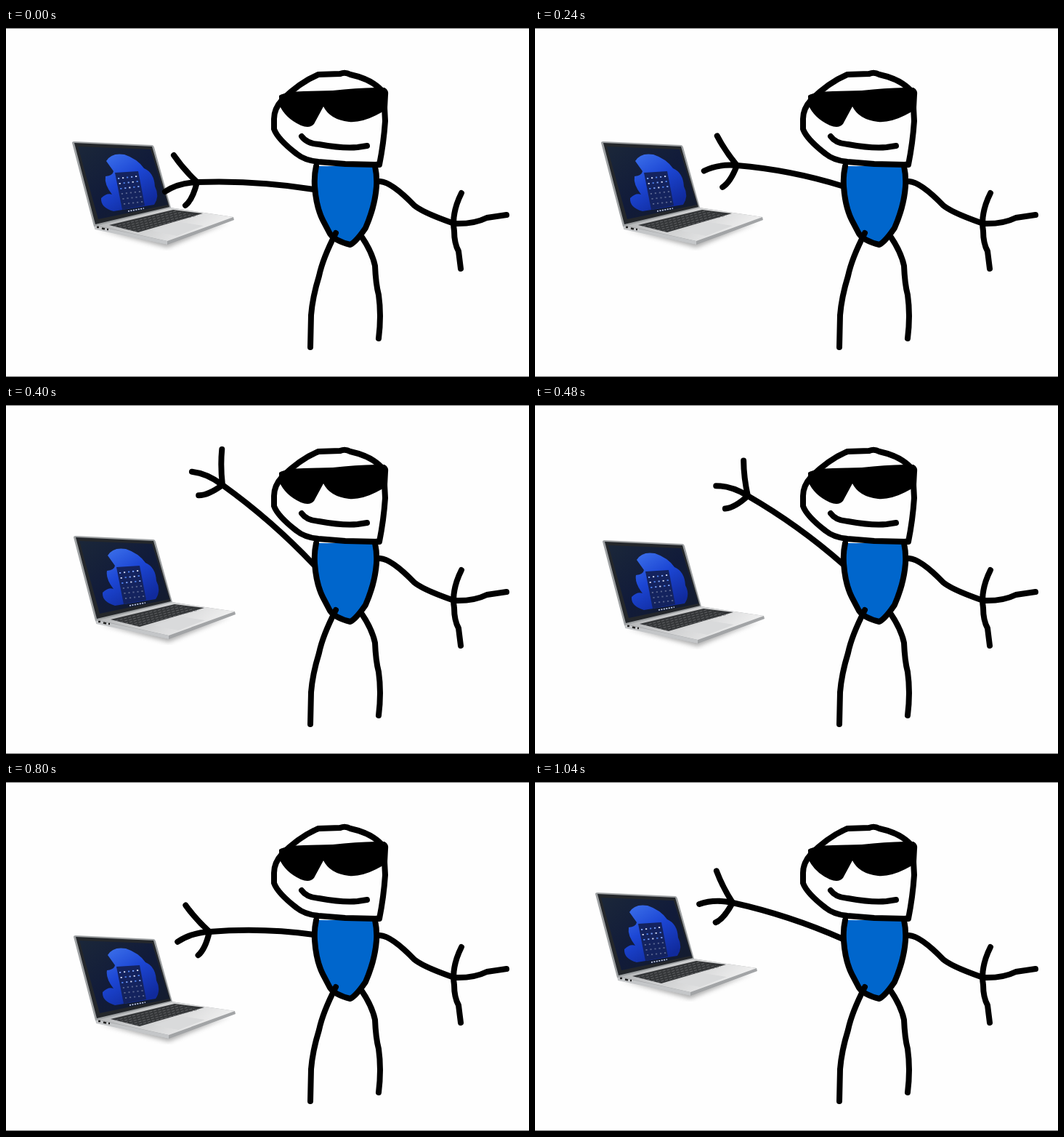
Recreate the animation shown at these times as an HTML page. Size 720 px wide and 480 px high, loop 1120 ms.

```html
<!DOCTYPE html>
<html lang="en">
<head>
<meta charset="utf-8">
<title>Stick figure and laptop</title>
<style>
  html, body { margin: 0; width: 100%; height: 100%; overflow: hidden; background: #fefefe; }
  svg { display: block; width: 100vw; height: 100vh; }
  .ink { fill: none; stroke: #000; stroke-width: 8; stroke-linecap: round; stroke-linejoin: round; }
</style>
</head>
<body>
<svg viewBox="0 0 720 480">
  <defs>
    <linearGradient id="deck" x1="0" y1="0" x2="1" y2="0.3">
      <stop offset="0" stop-color="#a9abad"/>
      <stop offset="0.5" stop-color="#cfd0d1"/>
      <stop offset="1" stop-color="#f0f0f0"/>
    </linearGradient>
    <linearGradient id="screen" x1="0" y1="0" x2="1" y2="1">
      <stop offset="0" stop-color="#1b2739"/>
      <stop offset="0.5" stop-color="#111b3a"/>
      <stop offset="1" stop-color="#141c2c"/>
    </linearGradient>
    <linearGradient id="glow" x1="0" y1="0" x2="0.6" y2="1">
      <stop offset="0" stop-color="#3f74ec"/>
      <stop offset="0.5" stop-color="#1c46d4"/>
      <stop offset="1" stop-color="#102a9c"/>
    </linearGradient>
    <filter id="blur"><feGaussianBlur stdDeviation="3"/></filter>
  </defs>

  <rect width="720" height="480" fill="#fefefe"/>
  <path d="M0 .5H720M0 479.5H720" stroke="#777"/>

  <g id="laptop">
    <path d="M126 277L222 302L308 266L222 288Z" fill="#777" opacity=".6" filter="url(#blur)"/>
    <path d="M121 271L226 247L313 260L314 264L222 298L122 276Z" fill="#a2a4a6"/>
    <path d="M122 271L226 247L313 260L222 293Z" fill="url(#deck)"/>
    <path d="M122 272L222 293V298L122 277Z" fill="#c4c6c8"/>
    <path d="M125 274h3M132 275.5l4 1M139 277h2" stroke="#222" stroke-width="2.5"/>
    <path d="M142 271L230 250L271 255L182 281Z" fill="#343638"/>
    <g id="keys" stroke="#737577" stroke-width=".7"></g>
    <path d="M202 279L240 267L272 272L235 286Z" fill="#d9dadb"/>
    <path d="M91 158Q91 156 94 156L201 161Q203 161 204 164L227 247L121 273Z" fill="#9da0a2"/>
    <path d="M94 158L201 163L225 246L123 270Z" fill="#24272b"/>
    <path d="M99 163L199 167L223 243L127 263Z" fill="url(#screen)"/>
    <path d="M138 183Q145 171 163 174Q181 180 190 193Q204 199 205 218Q212 231 204 243L148 252Q130 247 131 234Q139 226 146 229Q135 215 137 204Q147 203 148 197Z" fill="url(#glow)"/>
    <path d="M150 199L182 197L191 244L160 250Z" fill="#14235e"/>
    <g id="icons"></g>
    <path d="M168 252L190 248" stroke="#cbd5ee" stroke-width="1.6" stroke-dasharray="2 1.5"/>
  </g>

  <path id="arm" class="ink"/>
  <path id="hand" class="ink" d="M-32-37Q-19-18 0 0M-44 13Q-26 1 0 0M-16 32Q-6 24 0 0"/>

  <g class="ink">
    <path fill="#06c" d="M427 190Q424 203 425 218Q427 246 436 264L446 283Q453 293 474 298Q482 294 495 275Q508 245 510 218Q511 204 508 190"/>
    <path d="M454 282Q436 317 431 341Q422 370 420 395L419 439"/>
    <path d="M489 286Q504 308 508 327Q509 352 513 367Q517 395 513 427"/>
    <path d="M515 211Q531 212 562 244Q574 254 617 269Q644 270 662 261L689 257"/>
    <path d="M627 227Q613 255 617 279Q617 296 623 307L626 331"/>
    <path fill="#fefefe" d="M430 64L460 63Q467 60 474 64Q506 71 520 89L522 128Q520 158 514 188L467 187L430 184Q411 182 400 173Q374 153 369 139V125Q369 111 380 99Q404 75 430 64Z"/>
    <path d="M407 149Q414 159 431 160Q464 166 484 164L497 162"/>
  </g>
  <path d="M376 93Q386 87 410 87L450 86Q487 82 521 82Q527 85 526 92L525 111Q495 131 472 129Q446 126 437 108L424 132Q418 139 406 134Q384 124 376 105Z"/>
</svg>

<script>
const STEP = 80, FRAMES = 14;
const byId = id => document.getElementById(id);

// [step, laptop dx, dy, wrist x, y, hand angle, shoulder x, y]
const poses = [
  [0, 0, 0, 263, 212, 0, 424, 222],
  [3, 0, 0, 278, 189, 7, 422, 217],
  [4, -6, 62, 267, 272, -25, 418, 215],
  [5, 2, 24, 298, 110, 40, 424, 220],
  [6, 2, 30, 293, 125, 34, 424, 219],
  [8, 2, 43, 293, 125, 34, 424, 219],
  [10, 2, 55, 280, 206, -1, 424, 210],
  [11, 2, 61, 274, 235, -12, 421, 212],
  [13, -8, -4, 272, 166, 14, 424, 216]
];

function poseAt(step) {
  const next = poses.findIndex(p => p[0] >= step);
  const b = poses[next], a = poses[Math.max(0, next - 1)];
  const k = b === a ? 0 : (step - a[0]) / (b[0] - a[0]);
  return a.map((v, i) => v + (b[i] - v) * k);
}

function addDetails() {
  let keys = '', icons = '';
  for (let i = 1; i < 6; i++) {
    const x = 142 + i * 6.7, y = 271 + i * 1.7;
    keys += `<path d="M${x} ${y}l88-21.5" stroke-dasharray="4 2"/>`;
  }
  for (let row = 0; row < 6; row++) {
    for (let col = 0; col < 5; col++) {
      const x = 154 + col * 6 + row * 1.6, y = 206 + row * 7 - col * 0.7;
      const color = row < 3 ? ['#7fa6ff', '#d5dcf4', '#4e83f2'][(row + col) % 3] : '#57648f';
      icons += `<rect x="${x}" y="${y}" width="2.2" height="1.8" fill="${color}"/>`;
    }
  }
  byId('keys').innerHTML = keys;
  byId('icons').innerHTML = icons;
}

function draw(time) {
  const step = Math.floor(time / STEP) % FRAMES;
  const [, dx, dy, wx, wy, angle, sx, sy] = poseAt(step);
  const length = Math.hypot(sx - wx, sy - wy), bow = 8;
  const cx = (wx + sx) / 2 + (sy - wy) / length * bow;
  const cy = (wy + sy) / 2 - (sx - wx) / length * bow;
  byId('laptop').setAttribute('transform', `translate(${dx} ${dy})`);
  byId('arm').setAttribute('d', `M${wx} ${wy}Q${cx} ${cy} ${sx} ${sy}`);
  byId('hand').setAttribute('transform', `translate(${wx} ${wy}) rotate(${angle})`);
}

addDetails();
const start = performance.now();
function tick() {
  draw(performance.now() - start);
  requestAnimationFrame(tick);
}
tick();
</script>
</body>
</html>
```
